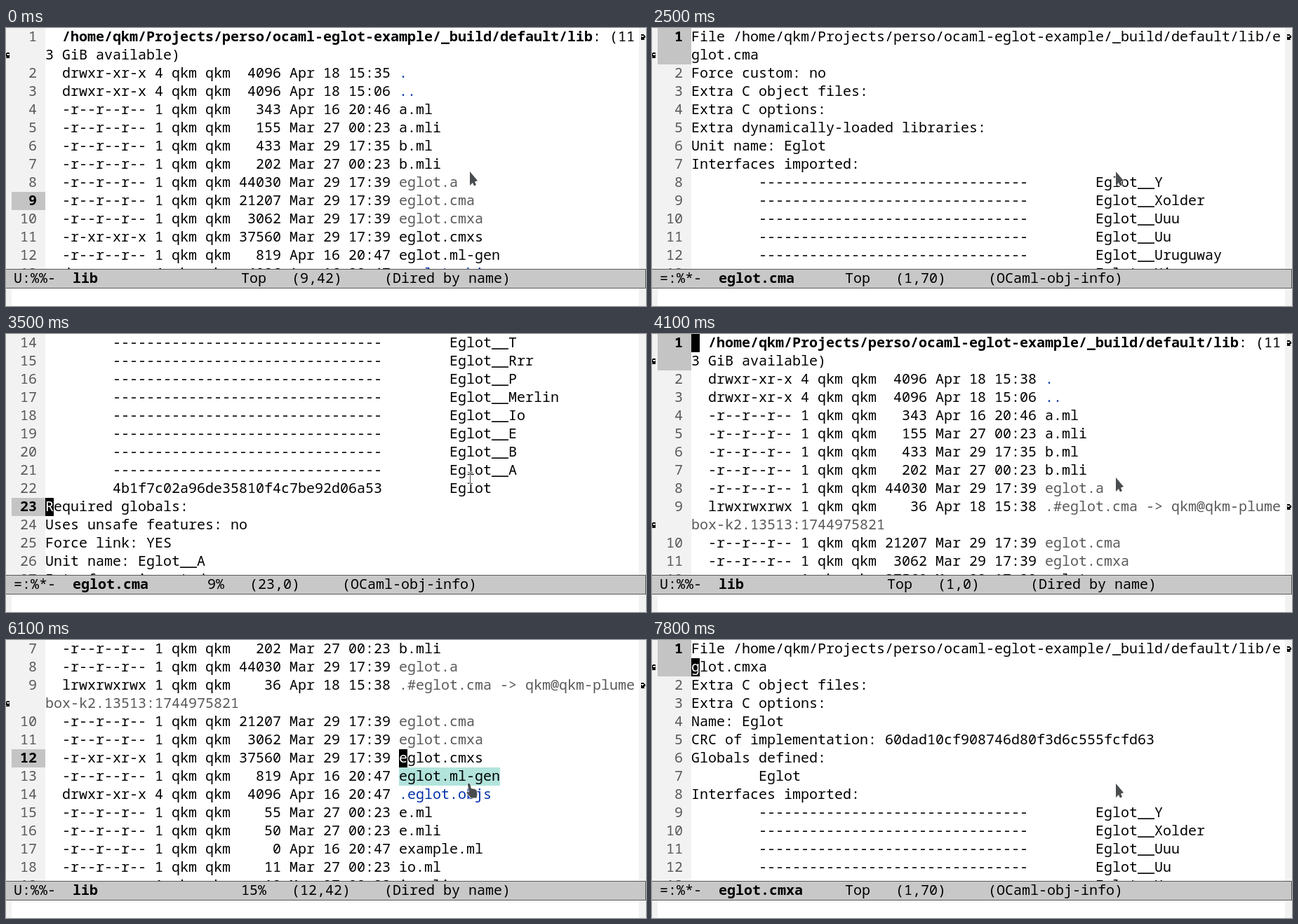
Animation, 912 px wide and 397 px high, one loop 8 s. Source, as an HTML page with a canvas:

```html
<!DOCTYPE html>
<html lang="en">
<head>
<meta charset="utf-8">
<title>Dired and object info</title>
<style>
  html, body { margin: 0; width: 100%; height: 100%; overflow: hidden; background: #fff; }
  canvas { display: block; }
</style>
</head>
<body>
<canvas id="stage" width="912" height="397"></canvas>
<script>
const ctx = document.getElementById('stage').getContext('2d');
const LOOP = 8000;
const W = 912, H = 397, CELL = 12, ROW = 26, BASE = 19;
const LEFT = 56, COLS = 70, BAR = 344, FRINGE = 902;
const INK = '#000', DIM = '#595959', BLUE = '#0031a9', GUTTER = '#f2f2f2';
const FACE = '20px "Noto Sans Mono", "DejaVu Sans Mono", monospace';

// ---- Buffers: each line is a list of [text, colour, bold] runs ----
const USER = 'qkm';
const DIR = `/home/${USER}/Projects/perso/ocaml-eglot-example/_build/default/lib`;
const plain = text => [[text, INK]];
const RO = '-r--r--r--', RX = '-r-xr-xr-x', DR = 'drwxr-xr-x';

const entry = (mode, links, size, date, name, color = INK) => [
  [`  ${mode} ${links} ${USER} ${USER} ${String(size).padStart(5)} ${date} `, INK],
  [name, color]
];

function listing(stamp, locked) {
  const mar27 = 'Mar 27 00:23', mar29 = 'Mar 29 17:39', apr16 = 'Apr 16 20:47';
  const lines = [
    [['  ', INK], [DIR, INK, true], [': (113 GiB available)', INK]],
    entry(DR, 4, 4096, stamp, '.', BLUE),
    entry(DR, 4, 4096, 'Apr 18 15:06', '..', BLUE),
    entry(RO, 1, 343, 'Apr 16 20:46', 'a.ml'),
    entry(RO, 1, 155, mar27, 'a.mli'),
    entry(RO, 1, 433, 'Mar 29 17:35', 'b.ml'),
    entry(RO, 1, 202, mar27, 'b.mli'),
    entry(RO, 1, 44030, mar29, 'eglot.a', DIM)
  ];
  if (locked) {
    lines.push(entry('lrwxrwxrwx', 1, 36, stamp,
      `.#eglot.cma -> ${USER}@${USER}-plumebox-k2.13513:1744975821`, DIM));
  }
  return lines.concat([
    entry(RO, 1, 21207, mar29, 'eglot.cma', DIM),
    entry(RO, 1, 3062, mar29, 'eglot.cmxa', DIM),
    entry(RX, 1, 37560, mar29, 'eglot.cmxs'),
    entry(RO, 1, 819, apr16, 'eglot.ml-gen'),
    entry(DR, 4, 4096, apr16, '.eglot.objs', BLUE),
    entry(RO, 1, 55, mar27, 'e.ml'),
    entry(RO, 1, 50, mar27, 'e.mli'),
    entry(RO, 1, 0, apr16, 'example.ml'),
    entry(RO, 1, 11, mar27, 'io.ml'),
    entry(RO, 1, 12, mar27, 'io.mli')
  ]);
}

const imported = (name, sum = '-'.repeat(32)) => ' '.repeat(8) + sum + ' '.repeat(8) + name;
const imports = 'Y Xolder Uuu Uu Uruguway Ui T Rrr P Merlin Io E B A'
  .split(' ').map(name => imported('Eglot__' + name));

const cma = [
  `File ${DIR}/eglot.cma`, 'Force custom: no', 'Extra C object files:', 'Extra C options:',
  'Extra dynamically-loaded libraries:', 'Unit name: Eglot', 'Interfaces imported:',
  ...imports, imported('Eglot', '4b1f7c02a96de35810f4c7be92d06a53'),
  'Required globals:', 'Uses unsafe features: no', 'Force link: YES',
  'Unit name: Eglot__A', 'Interfaces imported:'
].map(plain);

const cmxa = [
  `File ${DIR}/eglot.cmxa`, 'Extra C object files:', 'Extra C options:', 'Name: Eglot',
  'CRC of implementation: 60dad10cf908746d80f3d6c555fcfd63', 'Globals defined:',
  ' '.repeat(8) + 'Eglot', 'Interfaces imported:', ...imports
].map(plain);

const dired = { flags: 'U:%%-', name: 'lib', mode: '(Dired by name)', posCol: 27, modeCol: 44 };
const info = { flags: '=:%*-', mode: '(OCaml-obj-info)', posCol: 22, modeCol: 39 };
const buffers = {
  before: { ...dired, lines: listing('Apr 18 15:35', false) },
  after: { ...dired, lines: listing('Apr 18 15:38', true), percent: { 7: '15%' } },
  cma: { ...info, name: 'eglot.cma', lines: cma, percent: { 7: '4%', 14: '9%' } },
  cmxa: { ...info, name: 'eglot.cmxa', lines: cmxa }
};

// ---- Timeline: hard steps, each holds until the next ----
const steps = [];
const at = (time, buf, line, col, more) =>
  steps.push({ time, buf, line, col, top: 1, cursor: true, pointer: 'arrow', ...more });
const off = { cursor: false }, note = { note: true };

at(0, 'before', 9, 42, off);
at(400, 'before', 9, 42);
at(900, 'cma', 1, 0, note);
at(1400, 'cma', 1, 0, { ...note, ...off });
at(2000, 'cma', 1, 70);
at(2500, 'cma', 1, 70, off);

// Held key: 25 lines per second, the view recentres at its end.
for (let k = 0; k < 10; k++) {
  const line = Math.min(24, Math.floor(3 + 2.5 * k));
  const top = line < 13 ? 1 : line < 20 ? 7 : 14;
  at(2700 + 100 * k, 'cma', line, 0, { top, pointer: top > 1 ? 'beam' : 'arrow' });
}

at(4100, 'after', 1, 0);
at(4600, 'after', 1, 0, off);
at(5100, 'after', 2, 42);
at(5200, 'after', 3, 42);
at(5600, 'after', 3, 42, off);
[4, 6, 8, 10].forEach((line, k) => at(5700 + 100 * k, 'after', line, 42));
const hover = { top: 7, pointer: 'hand', hover: 13 };
at(6100, 'after', 12, 42, hover);
at(6200, 'after', 13, 42, hover);
at(6600, 'after', 12, 42, hover);
at(6700, 'after', 11, 42, hover);
at(7200, 'cmxa', 1, 0, note);
at(7700, 'cmxa', 1, 0, { ...note, ...off });
at(7800, 'cmxa', 1, 70);

// ---- Drawing ----
function box(x, y, w, h, color) {
  ctx.fillStyle = color;
  ctx.fillRect(x, y, w, h);
}

function write(text, x, y, color = INK, bold = false) {
  ctx.font = (bold ? 'bold ' : '') + FACE;
  ctx.fillStyle = color;
  ctx.fillText(text, x, y + BASE);
}

// Curly wrap mark; dir is 1 for the left fringe and -1 for the right one.
function wrapMark(x, y, dir) {
  ctx.save();
  ctx.translate(x, y + 9);
  ctx.scale(dir, 1);
  box(2, 0, 4, 1, INK);
  box(1, 1, 5, 1, INK);
  box(0, 2, 2, 3, INK);
  box(2, 3, 1, 3, INK);
  box(1, 4, 5, 2, INK);
  box(5, 3, 1, 1, INK);
  box(2, 6, 4, 1, INK);
  box(1, 7, 5, 1, INK);
  ctx.restore();
}

function drawLine(line, number, row, s) {
  const length = line.reduce((n, run) => n + run[0].length, 0);
  const rows = Math.ceil(length / COLS);
  const y = row * ROW, active = number === s.line;

  if (active) box(8, y, 48, rows * ROW, '#c4c4c4');
  write(String(number).padStart(3), 8, y, active ? INK : DIM, active);
  for (let r = 1; r < rows; r++) {
    wrapMark(911, y + (r - 1) * ROW, -1);
    wrapMark(-1, y + r * ROW, 1);
  }

  let col = 0;
  line.forEach(([text, color, bold], i) => {
    if (s.hover === number && i === 1) {
      box(LEFT + col * CELL, y, text.length * CELL, ROW, '#b2e4dc');
    }
    while (text) {
      const part = text.slice(0, COLS - col % COLS);
      write(part, LEFT + col % COLS * CELL, y + Math.floor(col / COLS) * ROW, color, bold);
      col += part.length;
      text = text.slice(part.length);
    }
  });

  if (active && s.cursor) {
    const x = LEFT + s.col % COLS * CELL, cy = y + Math.floor(s.col / COLS) * ROW;
    box(x, cy, CELL, ROW, INK);
    write(line.map(run => run[0]).join('')[s.col], x, cy, '#fff');
  }
  return rows;
}

function drawBar(buf, s) {
  box(0, BAR, W, 28, '#5a5a5a');
  box(0, BAR + 1, W - 1, 26, '#c8c8c8');
  const put = (text, col, bold) => write(text, 11 + col * CELL, BAR + 1, INK, bold);
  const place = s.top === 1 ? 'Top' : buf.percent[s.top];
  put(buf.flags, 0);
  put(buf.name, 7, true);
  put(place.padStart(3), buf.posCol);
  put(`(${s.line},${s.col})`, buf.posCol + 6);
  put(buf.mode, buf.modeCol);
}

const pointers = {
  arrow: new Path2D('M661 205V225L665 221L667 225.5L670 224L668 219.5L672 218Z'),
  hand: new Path2D('M658 206.5q0-2 1.5-2t2 2l1.5 6q1-1 2.5 .3q1.5-1 2.5 .7q2-.7 2.5 1.5' +
    'l1 5l-1 5.5h-8l-5.5-6.5q-1-2.5 1-2.5l2 1Z'),
  beam: new Path2D('M658 197.5h2.5l1 1l1-1h2.5M661.5 198v15M658 213.5h2.5l1-1l1 1h2.5')
};

function drawPointer(kind) {
  const path = pointers[kind], beam = kind === 'beam';
  ctx.lineJoin = 'round';
  ctx.lineWidth = beam ? 2.5 : 1.5;
  ctx.strokeStyle = 'rgba(255,255,255,.8)';
  ctx.stroke(path);
  if (beam) {
    ctx.lineWidth = 1;
    ctx.strokeStyle = '#4d4d4d';
    ctx.stroke(path);
  } else {
    ctx.fillStyle = '#4a4d4f';
    ctx.fill(path);
  }
}

function draw(t) {
  const s = steps.filter(step => step.time <= t).pop();
  const buf = buffers[s.buf];
  box(0, 0, W, H, '#fff');
  box(0, 0, LEFT, BAR, GUTTER);
  box(0, BAR, 8, H - BAR, GUTTER);
  box(FRINGE, 0, W - FRINGE, H, GUTTER);

  for (let row = 0, n = s.top; row * ROW < BAR && n <= buf.lines.length; n++) {
    row += drawLine(buf.lines[n - 1], n, row, s);
  }
  drawPointer(s.pointer);

  drawBar(buf, s);
  box(8, BAR + 28, FRINGE - 8, H - BAR - 28, '#fff');
  if (s.note) write('Note: file is write protected', 8, BAR + 28);
}

const start = performance.now();
function tick() {
  draw((performance.now() - start) % LOOP);
  requestAnimationFrame(tick);
}
tick();
</script>
</body>
</html>
```
